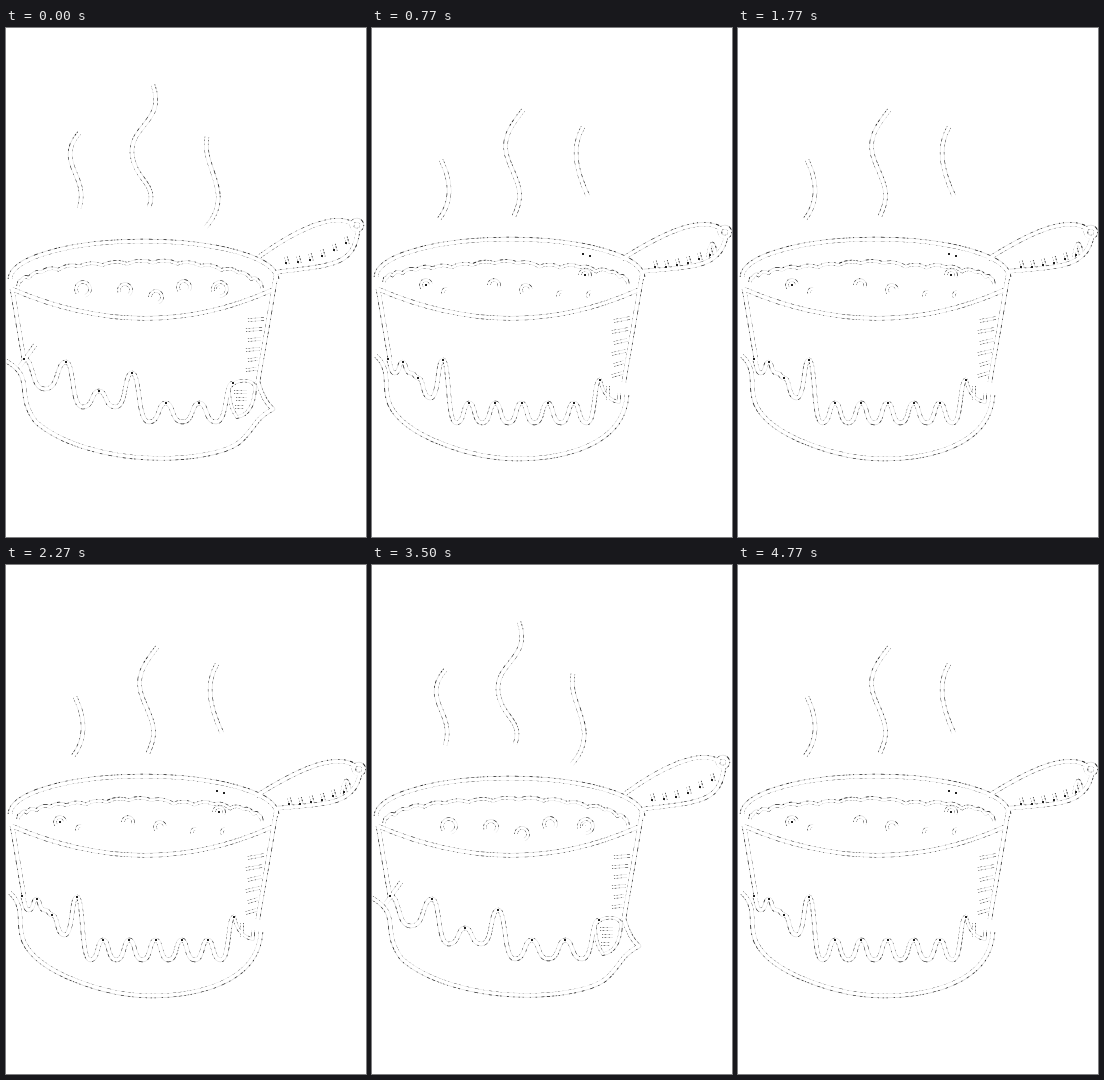
An HTML page with a canvas that plays this animation: 360 by 509 pixels, repeating every 5010 ms.

```html
<!DOCTYPE html>
<html lang="en">
<head>
<meta charset="utf-8">
<title>Steaming saucepan</title>
<style>
  html, body { margin: 0; width: 100%; height: 100%; overflow: hidden; background: #fff; }
  canvas { display: block; }
</style>
</head>
<body>
<canvas width="360" height="509"></canvas>
<script>
const ctx = document.querySelector('canvas').getContext('2d');

function seeded(seed) {
  return () => (seed = seed * 16807 % 2147483647) / 2147483647;
}

// Irregular dashes that break up the dark edge of the ink.
const dashRandom = seeded(77);
const dashes = Array.from({ length: 40 }, (_, i) => 1 + dashRandom() * (i % 2 ? 5 : 3));

// Evenly spaced drips: pointed where they part, round at the tips.
function drips(x, y, endX, endY, count, partY, tipY, dots) {
  const path = new Path2D(), width = (endX - x) / count;
  path.moveTo(x, y);
  for (let i = 1; i <= count; i++) {
    const tipX = x + width / 2, nextX = x + width, nextY = i < count ? partY : endY;
    path.bezierCurveTo(x + width * .25, y, tipX - width * .35, tipY, tipX, tipY);
    path.bezierCurveTo(tipX + width * .35, tipY, nextX - width * .25, nextY, nextX, nextY);
    dots.push([nextX, nextY]);
    [x, y] = [nextX, nextY];
  }
  return path;
}

// Uneven bumps along the back half of an ellipse.
function froth(cy, ry, bumps, seed) {
  const path = new Path2D(), random = seeded(seed);
  let x = 12, y = cy;
  path.moveTo(x, y);
  for (let i = 1; i <= bumps; i++) {
    const angle = Math.PI * (1 + i / bumps);
    const nextX = 134 + 122 * Math.cos(angle);
    const nextY = cy + ry * Math.sin(angle) + random() * 3;
    path.quadraticCurveTo((x + nextX) / 2, (y + nextY) / 2 - 5, nextX, nextY);
    [x, y] = [nextX, nextY];
  }
  return path;
}

function hatch(y, gap, slope) {
  const path = new Path2D();
  for (let i = 0; i < 6; i++) {
    path.moveTo(242 - i % 2 * 2, y + i * gap);
    path.lineTo(258 - i * 1.5, y + i * gap - slope);
  }
  return path;
}

function grip(x, y, gap, rise, dots) {
  const path = new Path2D();
  for (let i = 0; i < 6; i++) {
    const tickX = x + i * gap, tickY = y - i * i * rise;
    path.moveTo(tickX, tickY - 4);
    path.lineTo(tickX + 2, tickY + 3);
    dots.push([tickX, tickY + 2]);
  }
  return path;
}

function bubbles(...list) {
  const path = new Path2D();
  list.forEach(([x, y, r], i) => {
    const start = Math.PI * (.8 + i % 3 * .1), sweep = Math.min(6.28, r * .72);
    path.moveTo(x + r * Math.cos(start), y + r * Math.sin(start));
    path.arc(x, y, r, start, start + sweep);
  });
  return path;
}

function pot(rimY, rimRadius, knobX, knobY) {
  const path = new Path2D('M6 261Q140 319 266 262M6 261L18 332M270 248L252 354');
  path.moveTo(4, rimY);
  path.ellipse(137.5, rimY, 133.5, rimRadius, 0, Math.PI, 2 * Math.PI);
  path.moveTo(knobX + 5, knobY);
  path.arc(knobX, knobY, 5, 0, 2 * Math.PI);
  return path;
}

function tallSteam() {
  const dots = [[18, 331]];
  return {
    dots,
    bold: [
      new Path2D('M73 105C48 135 84 148 73 180M147 57C160 92 124 98 126 125S152 155 143 179M201 109C195 140 230 165 200 199'),
      new Path2D('M254 228C290 202 328 184 347 196M352 203C348 238 325 237 272 244'),
      new Path2D('M0 333C30 350 8 365 30 394C55 416 100 428 140 430S222 426 236 412S250 390 267 381Q258 374 252 354M29 317L14 338'),
      pot(251, 38, 351, 197),
      drips(18, 331, 60, 334, 1, 0, 361, dots),
      drips(60, 334, 126, 345, 2, 363, 379, dots),
      drips(126, 345, 227, 355, 3, 375, 394, dots)
    ],
    fine: [
      froth(258, 24, 15, 12),
      hatch(292, 10, 1),
      grip(280, 233, 12, .8, dots),
      bubbles([77, 261, 7], [119, 262, 6], [150, 269, 6], [178, 259, 6], [214, 261, 7], [214, 261, 2]),
      new Path2D('M223 360C232 349 246 352 249 358C249 378 241 388 231 389Q223 378 223 360M228 364h13M230 371h11M229 379h9')
    ]
  };
}

function lowSteam() {
  const dots = [[16, 331], [54, 257], [213, 247], [211, 226], [218, 228]];
  return {
    dots,
    bold: [
      new Path2D('M69 132C78 150 82 172 67 191M151 82C138 99 128 112 137 134S153 165 142 188M211 99C199 120 204 142 216 168'),
      new Path2D('M250 231C285 209 326 187 348 200M354 210C347 239 322 239 272 243'),
      new Path2D('M4 328C20 342 10 360 18 377C32 408 100 431 145 431S252 418 255 367'),
      pot(249, 38, 353, 204),
      drips(15, 331, 46, 350, 2, 334, 345, dots),
      drips(46, 350, 71, 332, 1, 0, 370, dots),
      drips(71, 332, 228, 352, 6, 375, 395, dots)
    ],
    fine: [
      froth(254, 19, 17, 31),
      hatch(293, 11, 3),
      grip(283, 237, 11, .5, dots),
      bubbles([54, 257, 5], [74, 264, 3], [122, 257, 5], [154, 262, 5], [189, 267, 3], [213, 247, 5], [219, 267, 3]),
      new Path2D('M228 351Q232 372 247 374V365M236 358v14M336 229Q340 204 344 225')
    ]
  };
}

function strokeAll(paths, width, color, dash = []) {
  ctx.lineWidth = width;
  ctx.strokeStyle = color;
  ctx.setLineDash(dash);
  paths.forEach(path => ctx.stroke(path));
}

// White ink on white paper, visible only by its thin broken edges.
function draw({ bold, fine, dots }) {
  ctx.fillStyle = '#fff';
  ctx.fillRect(0, 0, 360, 509);
  ctx.lineJoin = 'round';
  ctx.lineCap = 'butt';
  for (const [color, dash] of [['#ddd', []], ['#222', dashes]]) {
    strokeAll(bold, 4.4, color, dash);
    strokeAll(fine, 3.4, color, dash);
  }
  // Pulling the white towards the middle leaves the outer edges darker.
  ctx.save();
  ctx.translate(137, 320);
  ctx.scale(.998, .998);
  ctx.translate(-137, -320);
  ctx.lineCap = 'square';
  strokeAll(bold, 3.5, '#fff');
  strokeAll(fine, 2.5, '#fff');
  ctx.restore();
  ctx.fillStyle = '#222';
  dots.forEach(([x, y]) => ctx.fillRect(Math.round(x) - 1, Math.round(y) - 1, 2, 2));
}

const LOOP = 5010;
const tall = tallSteam(), low = lowSteam();
let shown;

function tick() {
  const t = performance.now() % LOOP;
  const pose = t < 5000 && t % 500 < 270 ? tall : low;
  if (pose !== shown) draw(shown = pose);
  requestAnimationFrame(tick);
}
tick();
</script>
</body>
</html>
```
